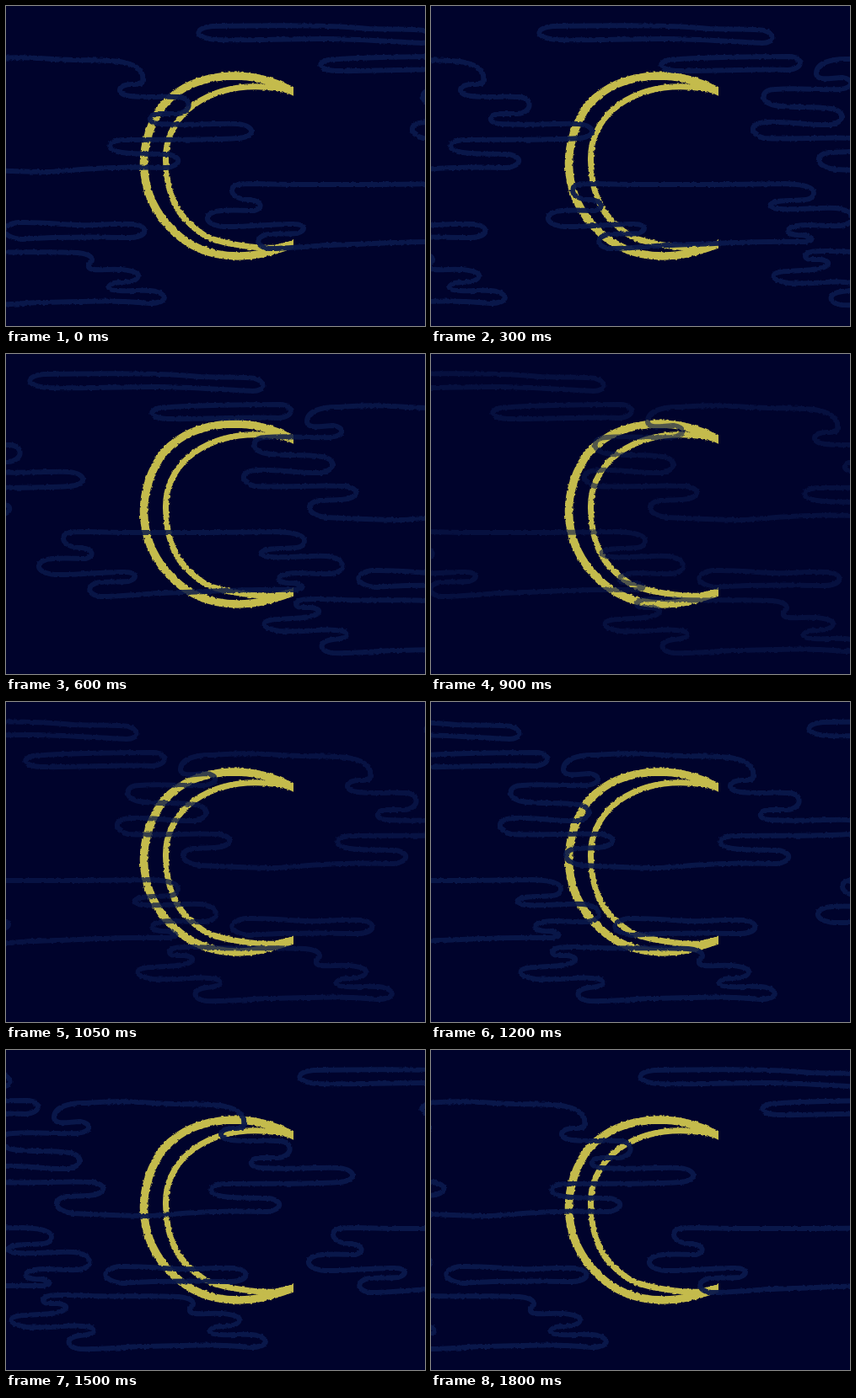
These frames come from a looping animation (497x380 px, 1950 ms). An HTML page without scripts:

```html
<!DOCTYPE html>
<html lang="en">
<head>
<meta charset="utf-8">
<title>Moon and drifting clouds</title>
<style>
  html, body { margin: 0; width: 100%; height: 100%; overflow: hidden; background: #00032c; }
  svg { display: block; width: 100%; height: 100%; }
  path { fill: none; stroke-linejoin: round; }
  .moon { stroke: #c4bb4c; }
  .clouds { stroke: #0a194c; stroke-width: 6; animation: fade 1950ms infinite; }
  .drift { animation: drift 1950ms steps(13, end) infinite; }

  /* thirteen held poses, 50px apart; the sky repeats every 620px */
  @keyframes drift { to { transform: translateX(-650px); } }

  @keyframes fade {
    0%, 15.385%, 76.923%, 100% { opacity: .95; animation-timing-function: steps(2, end); }
    30.769% { opacity: .85; animation-timing-function: steps(2, end); }
    46.154% { opacity: .62; animation-timing-function: steps(2, end); }
    61.538% { opacity: .9; animation-timing-function: steps(2, end); }
  }
</style>
</head>
<body>
<svg viewBox="0 0 497 380">
  <defs>
    <filter id="rough" filterUnits="userSpaceOnUse" x="0" y="0" width="950" height="380" color-interpolation-filters="sRGB">
      <feTurbulence type="fractalNoise" baseFrequency=".25" numOctaves="2" seed="4"/>
      <feDisplacementMap in="SourceGraphic" scale="3" xChannelSelector="R" yChannelSelector="G"/>
    </filter>
    <clipPath id="edge"><path d="M0 0H341V380H0Z"/></clipPath>

    <g id="sky" filter="url(#rough)">
      <!-- long and short pills at the top -->
      <path d="M245 24C300 23 390 22 430 27C460 28 485 27 495 29C508 32 508 44 493 44C460 43 420 39 380 39C330 39 280 41 250 40C222 38 222 26 245 24Z"/>
      <path d="M395 63C430 61 490 60 525 60C543 61 542 75 523 76C490 74 430 78 395 77C366 77 366 63 395 63Z"/>
      <!-- large cloud -->
      <path transform="translate(400)" d="M157 80C157 68 175 62 195 63C240 59 260 63 300 64C340 65 375 62 382 82C383 92 382 93 372 93C350 92 350 106 368 107C390 109 410 107 425 108C442 110 440 127 422 128L402 128C388 128 386 139 402 140C440 142 470 139 495 140C518 143 515 156 495 157C450 160 400 158 360 159C338 160 338 172 358 174C380 177 395 175 410 176C430 178 428 190 410 192C350 190 310 194 270 197C230 197 200 195 180 194C158 192 152 177 172 174C185 173 195 174 205 172C220 168 218 159 202 157C165 155 130 159 95 157C76 152 78 138 98 138C120 136 145 142 175 141C191 137 192 125 175 122C150 118 130 122 108 118C90 115 90 99 108 99C135 97 160 100 185 99C202 97 202 87 188 85C175 85 157 90 157 80Z"/>
      <!-- middle cloud -->
      <path transform="translate(200)" d="M68 219C68 211 80 211 95 211C170 213 250 212 320 211C340 212 354 214 354 222C353 234 335 229 312 232C299 234 298 241 315 241C340 242 360 239 380 240C405 243 405 259 385 261C365 262 350 258 335 261C319 264 320 271 335 272C355 272 356 281 340 280C290 278 230 283 180 284C150 286 130 288 112 288C95 286 95 273 112 271C122 270 135 271 145 270C157 267 155 259 142 259C115 258 85 263 58 262C33 260 33 245 55 243C70 242 82 243 95 243C105 240 104 232 90 230C78 230 68 226 68 219Z"/>
      <!-- low pill -->
      <path transform="translate(400)" d="M235 257C270 256 300 262 325 260C345 259 360 258 372 259C390 262 388 274 368 275C330 275 290 273 240 277C212 275 212 259 235 257Z"/>
      <!-- bottom cloud -->
      <path transform="translate(500)" d="M44 297C45 290 60 291 75 291C120 294 165 291 205 293C225 295 224 303 219 306C214 313 225 314 240 313C255 312 277 314 277 320C275 330 258 327 248 329C238 333 240 338 255 338C270 339 285 336 298 339C313 343 311 353 290 353C240 348 200 352 160 352C135 353 110 356 88 355C70 353 70 341 88 339C108 338 110 329 92 328C70 326 50 331 25 329C0 326 2 315 22 315C35 314 50 314 60 312C75 309 75 302 60 301C50 301 44 301 44 297Z"/>
    </g>
  </defs>

  <rect width="497" height="380" fill="#00032c"/>

  <g class="moon" clip-path="url(#edge)">
    <g filter="url(#rough)">
      <path stroke-width="9.5" d="M346 104C310 85 290 83 268 83C232 84 205 97 188 116C172 135 163 165 163.500 188C164 215 173 238 190 258C210 282 238 297 275 297C300 297 318 291 346 281"/>
      <path stroke-width="7" d="M346 103C318 95 300 95 286 96C258 98 236 106 217 122C198 139 189 160 189.500 183C190 210 196 230 206 245C216 258 226 267 238 274C262 284 300 288 320 287L346 281"/>
    </g>
  </g>

  <g class="clouds">
    <g class="drift">
      <use href="#sky" x="-620"/>
      <use href="#sky"/>
      <use href="#sky" x="620"/>
    </g>
  </g>
</svg>
</body>
</html>
```
